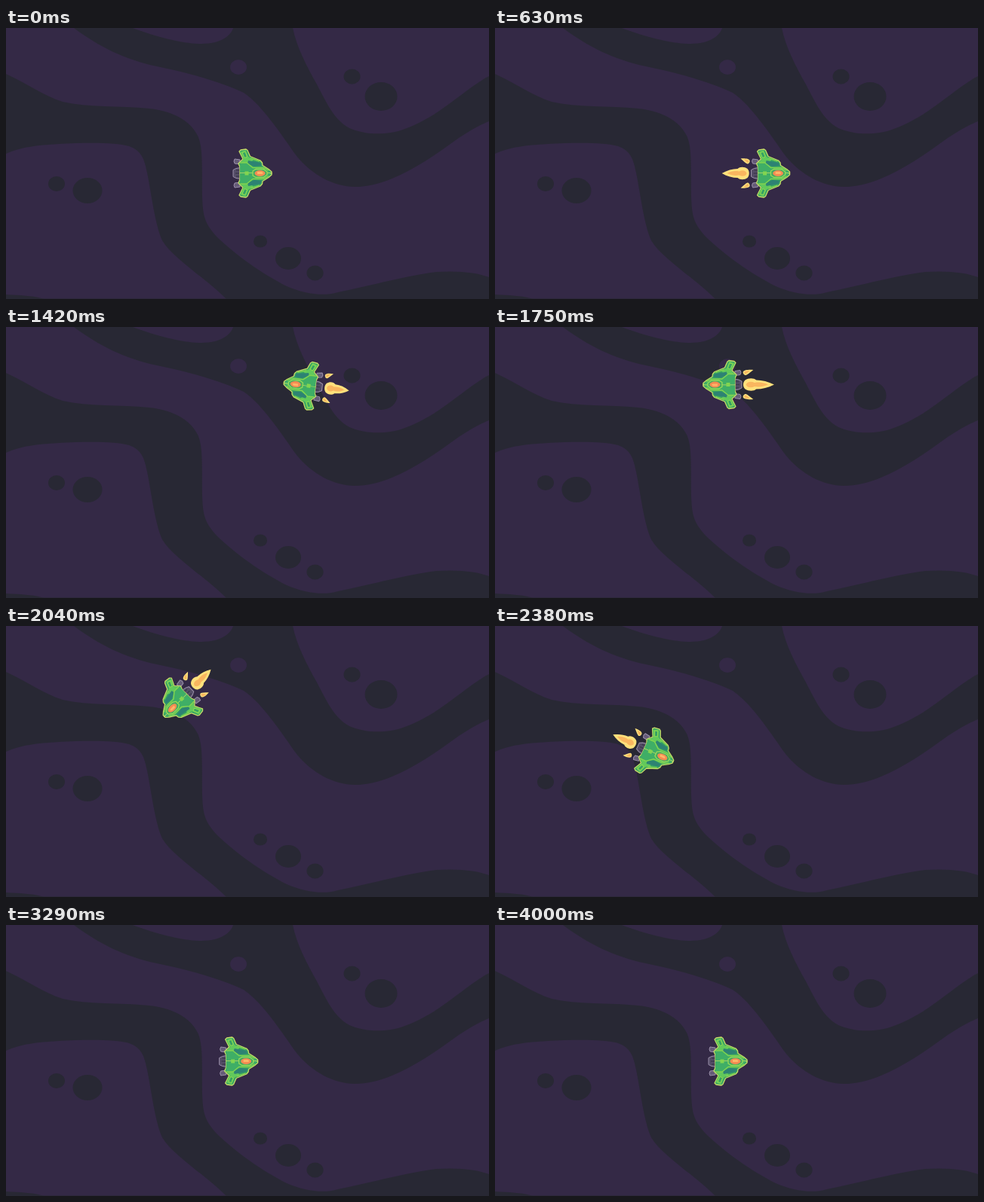
Animation, 640 px wide and 360 px high, one loop 4180 ms. Source, as an HTML page:

```html
<!DOCTYPE html>
<html lang="en">
<head>
<meta charset="utf-8">
<title>Ship flight</title>
<style>
  html, body { margin: 0; width: 100%; height: 100%; overflow: hidden; background: #282834; }
  svg { display: block; width: 100vw; height: 100vh; }
</style>
</head>
<body>
<svg viewBox="0 0 640 360" xmlns="http://www.w3.org/2000/svg">
  <rect width="640" height="360" fill="#282834"/>
  <g fill="#342946">
    <path d="M0 0H90C122 24 157 42 200 51C250 61 290 74 315 86C340 103 365 142 385 170C405 195 435 211 462 211C510 211 560 175 600 146C620 133 632 127 640 124V331C625 325 600 322 570 324C530 329 480 343 440 351C420 357 395 353 372 343C340 327 305 302 280 278C263 260 261 250 260 225C259 190 262 160 254 143C245 125 225 111 190 107C150 103 110 106 75 98C50 90 30 75 0 61Z"/>
    <path d="M168 0C200 12 235 21 258 21C285 21 298 10 301 0Z"/>
    <path d="M380 0C385 25 398 50 412 75C425 100 435 122 455 133C475 142 500 142 520 137C560 125 590 98 615 80C628 71 635 66 640 64V0Z"/>
    <path d="M0 167C20 158 40 156 70 154C110 152 145 152 163 157C180 163 183 174 187 192C193 222 197 258 206 280C216 302 265 333 292 360H50C40 356 20 355 0 354Z"/>
    <ellipse cx="308" cy="52" rx="11" ry="10"/>
  </g>
  <g fill="#282834">
    <ellipse cx="458.5" cy="64.5" rx="11" ry="10"/>
    <ellipse cx="497" cy="91" rx="21.5" ry="19"/>
    <ellipse cx="67" cy="207" rx="11" ry="10"/>
    <ellipse cx="108" cy="216" rx="19.5" ry="17"/>
    <ellipse cx="337" cy="283.5" rx="9" ry="8"/>
    <ellipse cx="374" cy="306" rx="17" ry="15"/>
    <ellipse cx="409.5" cy="325.5" rx="11" ry="10"/>
  </g>
  <rect y="359" width="640" height="1" fill="#282834" opacity=".6"/>

  <defs>
    <path id="route" d="M326 193H390C424 193 440 181 446 163C460 121 444 76.500 380 76.500H299C262 76.500 243 84 222 108C186 150 180 154 210 168.500C232 179 255 181 275 181H308"/>
    <g id="sideFlame">
      <path d="M-11-3.500C-6-4 0-3.500 1-1C1.500 1 0 3.500 -2 3.500C-4 3 -7 0 -11-3.500Z" fill="#ffe17c"/>
      <path d="M-7-2.500C-4-2.500 -1-2 -.5-.5C0 1 -1 2 -2 2C-4 1 -5-1 -7-2.500Z" fill="#f9b65f"/>
    </g>
    <g id="half" stroke-linejoin="round">
      <path d="M-23-19L-16-18V-12L-23-13L-24-16Z" fill="#655b78" stroke="#9b90aa"/>
      <path d="M-17-29L-15-31L-8-32L-6-30.500L-2.500-22.500L11-17L13.500-14L14-10.500L22-5.500L26-2V0H-16V-8L-18-13L-12-19Z"
        fill="#35a064" stroke="#c6dc66" stroke-width="1.300"/>
      <path d="M-16-28L-8.500-31L-5-22L2-18L-2-14H-15L-11-19Z" fill="#62c95b"/>
      <path d="M-13-27.500L-9-28.500L-6.500-22L-10-20.500Z" fill="#35a064" stroke="#8edb51"/>
      <path d="M-5-17L11-14L12.500-10L3-9L-6-13Z" fill="#2d8273"/>
      <path d="M-2-20L10-16" stroke="#82d550" stroke-width="1.500"/>
      <path d="M-16-13L-7-13L2-7.500L16-8L21-5L25 0H-16V-8Z" fill="#3fae66"/>
      <path d="M-16-14H-7L1-7.500H15L22-4" fill="none" stroke="#82d550" stroke-width="1.500"/>
    </g>
  </defs>

  <g id="ship">
    <g id="main">
      <path d="M-31 0C-24-4 -17-6 -10-6C-7-9 -1-9 3-6C6-3 6 3 3 6C-1 9 -7 9 -10 6C-17 6 -24 4 -31 0Z" fill="#ffe17c"/>
      <path d="M-24 0C-18-3 -13-3.500 -8-2.500C-4-5 1-4 2 0C1 4 -4 5 -8 2.500C-13 3.500 -18 3 -24 0Z" fill="#f9b65f"/>
    </g>
    <g id="upper"><use href="#sideFlame"/></g>
    <g id="lower"><use href="#sideFlame"/></g>
    <path d="M-13-8L-21-6.500L-25-4.500V4.500L-21 6.500L-13 8Z" fill="#554d67" stroke="#9b90aa"/>
    <path d="M-21-4H-15M-22 0H-15M-21 4H-15" stroke="#3e394f" stroke-width="1.500"/>
    <use href="#half"/>
    <use href="#half" transform="scale(1 -1)"/>
    <rect x="-9.500" y="-2.500" width="5" height="5" fill="#82d550"/>
    <path d="M1-3L5-5.500H15L20-2V2L15 5.500H5L1 3Z" fill="#43a962" stroke="#97dc57" stroke-width="1.300"/>
    <ellipse cx="10.500" cy="0" rx="7" ry="4" fill="#f58b52"/>
    <path d="M7-2H13L15 0L13 1H7Z" fill="#ffb568"/>
  </g>
</svg>
<script>
const LOOP = 4180, START = 420, STEP = 1000 / 24;
const THRUST_ON = 365, THRUST_OFF = 2580, SPEED = 0.285, DRAG = 150;

const $ = id => document.getElementById(id);
const ship = $('ship'), main = $('main'), upper = $('upper'), lower = $('lower');
const route = $('route'), total = route.getTotalLength();
const clamp = v => Math.max(0, Math.min(1, v));

// Distance flown by a body that nears full speed against drag
const gain = ms => SPEED * (ms - DRAG * (1 - Math.exp(-ms / DRAG)));
const reach = gain(THRUST_OFF - THRUST_ON) + SPEED * DRAG;

// Share of the route covered: thrust, then coasting to rest
function progress(t) {
  if (t <= THRUST_ON) return 0;
  if (t < THRUST_OFF) return gain(t - THRUST_ON) / reach;
  return 1 - SPEED * DRAG * Math.exp((THRUST_OFF - t) / DRAG) / reach;
}

function pose(t) {
  const d = progress(t) * total;
  const p = route.getPointAtLength(d);
  const a = route.getPointAtLength(Math.max(0, d - 2));
  const b = route.getPointAtLength(Math.min(total, d + 2));
  const turn = Math.atan2(b.y - a.y, b.x - a.x) * 180 / Math.PI;
  return `translate(${p.x} ${p.y}) rotate(${turn})`;
}

function draw(ms) {
  let t = ms % LOOP;
  t = t < START ? 0 : Math.min(4003, START + Math.floor((t - START + 5) / STEP) * STEP);
  ship.setAttribute('transform', pose(t));

  const power = clamp((t - 400) / 170) * clamp(1 - (t - THRUST_OFF) / 300);
  const long = power * (1 + 0.14 * Math.sin((t - 630) / 485 * 2 * Math.PI));
  main.setAttribute('transform', `translate(-33 0) scale(${long} ${power})`);
  upper.setAttribute('transform', `translate(-28 -16) scale(${long} ${power})`);
  lower.setAttribute('transform', `translate(-28 16) scale(${long} ${-power})`);
  for (const f of [main, upper, lower]) f.style.display = power > 0 ? '' : 'none';
}

const begin = performance.now();
function tick() {
  draw(performance.now() - begin);
  requestAnimationFrame(tick);
}
tick();
</script>
</body>
</html>
```
